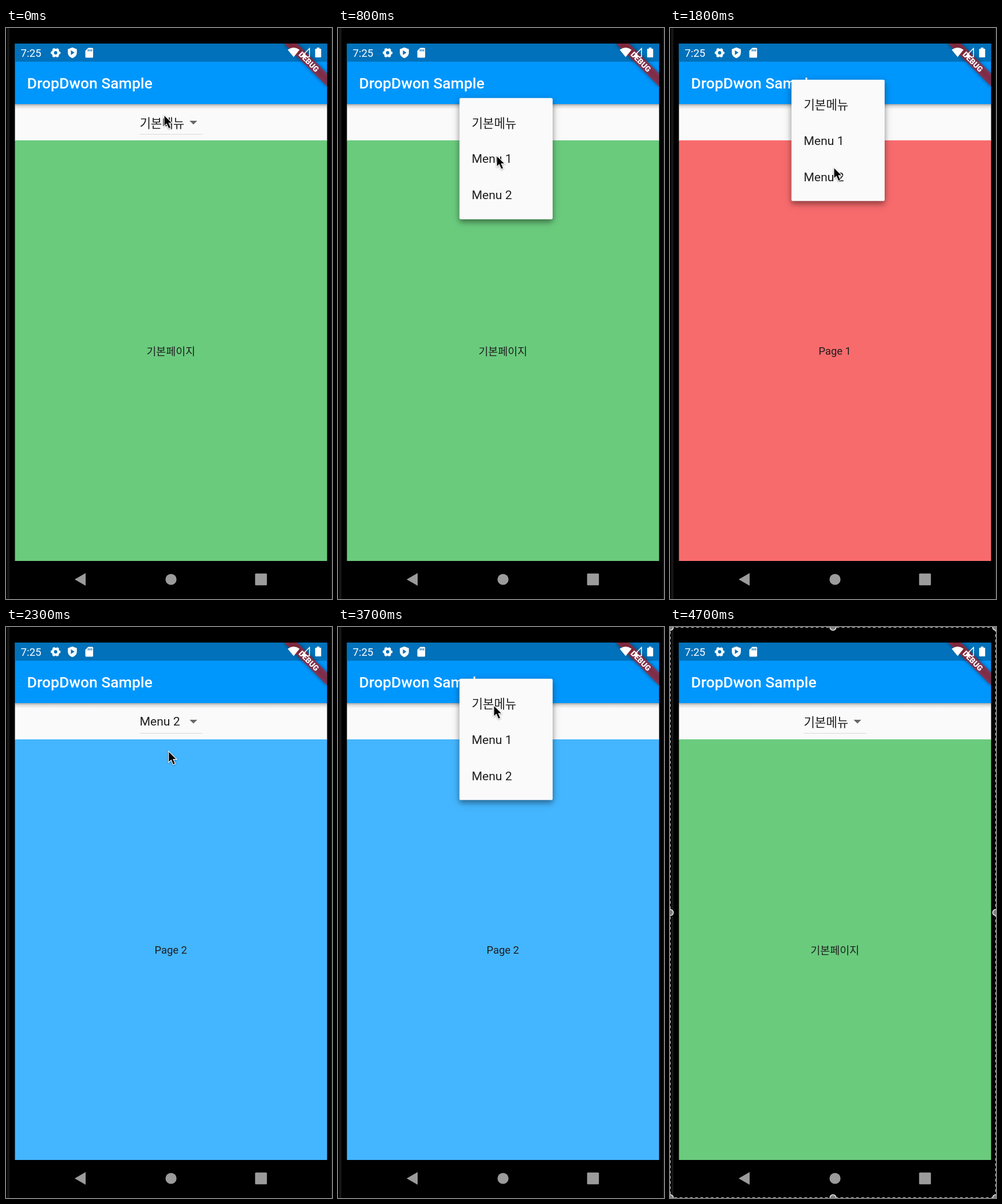
Animation, 565 px wide and 991 px high, one loop 5.4 s. Source, as an HTML page:

```html
<!DOCTYPE html>
<html lang="ko">
<head>
<meta charset="utf-8">
<title>Dropdown demo</title>
<style>
html, body { margin: 0; width: 100%; height: 100%; overflow: hidden; background: #000; }
svg { display: block; width: 565px; height: 991px; }
text { font-family: Roboto, "Noto Sans CJK KR", "Noto Sans CJK JP", "Noto Sans CJK", sans-serif; fill: #1f1f1f; }
.item { font-size: 21.06px; }
.page { font-size: 18.4px; text-anchor: middle; }
.white { fill: #fff; }
#card { fill: #fafafa; filter: drop-shadow(0 5px 4px rgba(0,0,0,.26)) drop-shadow(0 3px 7px rgba(0,0,0,.24)); }
#cursor { filter: drop-shadow(0 1.5px 1.5px rgba(0,0,0,.35)); }
</style>
</head>
<body>
<svg viewBox="0 0 565 991">
  <defs>
    <linearGradient id="shade" x1="0" y1="0" x2="0" y2="1">
      <stop offset="0" stop-opacity=".34"/>
      <stop offset=".4" stop-opacity=".12"/>
      <stop offset="1" stop-opacity="0"/>
    </linearGradient>
    <clipPath id="screen"><rect x="15.5" y="27" width="541" height="898"/></clipPath>
    <filter id="soft" x="-20%" y="-80%" width="140%" height="260%"><feGaussianBlur stdDeviation="3"/></filter>
  </defs>

  <rect width="565" height="991"/>
  <rect x="2" width="4" height="991" fill="#161616"/>
  <rect x="563" width="2" height="991" fill="#121212"/>

  <g clip-path="url(#screen)">
    <rect x="15" y="132" width="542" height="64" fill="#fafafa"/>
    <rect id="fill" x="15" y="195" width="542" height="730"/>
    <rect x="15" y="132" width="542" height="9" fill="url(#shade)"/>
    <rect x="15" y="27" width="542" height="105" fill="#0097fd"/>
    <rect x="15" y="27" width="542" height="31.5" fill="#0071ba"/>
    <text class="white" x="36.6" y="105" font-size="26.3" font-weight="500">DropDwon Sample</text>

    <text id="label" class="page" x="285.7"></text>
    <text id="value" class="item" x="231.7"></text>
    <path d="M318.2 161h13.2l-6.6 6.6z" fill="#666"/>
    <path d="M232 184.5h108.500" stroke="#d9d9d9"/>

    <g id="menu">
      <rect id="card" x="210.5" width="161.500" rx="2.6"/>
      <g id="items"></g>
    </g>

    <g transform="translate(556.500 27) rotate(45)">
      <rect x="-52.6" y="36.8" width="105.3" height="15.8" opacity=".5" filter="url(#soft)"/>
      <rect x="-52.6" y="36.8" width="105.3" height="15.8" fill="#c81c26" fill-opacity=".63"/>
      <text class="white" y="49.5" font-size="13.4" font-weight="900" text-anchor="middle">DEBUG</text>
    </g>
  </g>

  <g fill="#fff">
    <text class="white" x="25.5" y="50" font-size="18.5">7:25</text>
    <g transform="translate(86 43)" fill="none" stroke="#fff">
      <circle r="4.9" stroke-width="4"/>
      <circle r="7.2" stroke-width="2.4" stroke-dasharray="4.2 3.34" stroke-dashoffset="2.1"/>
    </g>
    <path d="M115 33.700l7.800 3v6c0 4.600-3.300 8-7.800 9.600c-4.500-1.600-7.800-5-7.800-9.600v-6z"/>
    <path d="M112.500 38.800v8l6.200-4z" fill="#0071ba"/>
    <path d="M142.500 34.500h7a1.500 1.500 0 0 1 1.500 1.500v14a1.500 1.500 0 0 1-1.500 1.500h-10.500a1.500 1.500 0 0 1-1.500-1.500v-10.500z"/>
    <path d="M142.500 37v3.500m3-3.500v3.500m3-3.500v3.500" stroke="#0071ba" stroke-width="1.500"/>
    <path d="M498.500 50.500l-10.300-12.800q10.300-7.400 20.600 0z"/>
    <path d="M526 35.500v14.500h-14.500z" fill="none" stroke="#fff" stroke-width="1.500"/>
    <path d="M512 50.500l7-7v7z"/>
    <path d="M538.800 34h4.400v2h2a1 1 0 0 1 1 1v13a1 1 0 0 1-1 1h-8.400a1 1 0 0 1-1-1v-13a1 1 0 0 1 1-1h2z"/>
  </g>

  <g fill="#9b9b9b">
    <path d="M119 957l19-11v22z"/>
    <circle cx="286" cy="957" r="9.600"/>
    <rect x="431.700" y="946.700" width="20.500" height="20.500" rx="1.500"/>
  </g>

  <path id="cursor" d="M0 0v19.500l4.400-4.100l3.500 8.100l3.700-1.600l-3.400-7.900h6z" stroke="#fff" stroke-width="1.100"/>

  <g id="frame">
    <rect x=".5" y=".5" width="564" height="990" fill="none" stroke="#000"/>
    <rect x=".5" y=".5" width="564" height="990" fill="none" stroke="#ddd" stroke-dasharray="5 4"/>
  </g>
</svg>
<script>
const LOOP = 5400, STEP = 100;
const ROW = 63.2, PAD = 10.5, CARD_H = 210.5;
const NAMES = ['기본메뉴', 'Menu 1', 'Menu 2'];
const PAGES = [['기본페이지', '#6acb7d'], ['Page 1', '#f86b6d'], ['Page 2', '#44b6ff']];

// Each visit to the menu: opening, closing, card top, choice before and after
const VISITS = [
  { open: 150, close: 850, top: 121.4, from: 0, to: 1 },
  { open: 1350, close: 2050, top: 89.8, from: 1, to: 2 },
  { open: 3050, close: 3850, top: 89.8, from: 2, to: 0 }
];

// Pointer path: time, x, y
const PATH = [
  [0, 274, 151], [300, 274, 152], [700, 275, 221], [900, 275, 222],
  [1200, 280, 173], [1500, 280, 171], [1800, 284, 242], [2100, 284, 246],
  [2400, 281, 205], [2800, 277, 157], [3100, 277, 157], [3500, 269, 138],
  [3700, 270, 136], [4000, 270, 136], [4300, 48, 408]
];
const FRAME_AT = 4700;

const $ = id => document.getElementById(id);
const clamp = v => Math.min(1, Math.max(0, v));
const mix = (a, b, p) => a + (b - a) * p;
const span = (v, a, b) => clamp((v - a) / (b - a));

function add(parent, tag, attrs) {
  const el = document.createElementNS('http://www.w3.org/2000/svg', tag);
  for (const k in attrs) el.setAttribute(k, attrs[k]);
  return parent.appendChild(el);
}

const items = NAMES.map(name => {
  const el = add($('items'), 'text', { class: 'item', x: 231.7 });
  el.textContent = name;
  return el;
});

for (const x of [0.5, 282.5, 564.5])
  for (const y of [0.5, 495.5, 990.5])
    if (x !== 282.5 || y !== 495.5)
      add($('frame'), 'circle', { cx: x, cy: y, r: 5.3, fill: '#808080', stroke: '#eee', 'stroke-width': 1.5 });

// Hangul sits slightly lower than Latin text
const drop = i => i === 0 ? 2 : 0;

function drawMenu(visit, t) {
  const on = visit && t < visit.close + 75;
  $('menu').style.display = on ? '' : 'none';
  if (!on) return;
  const p = clamp((t - visit.open) / 300);
  const grow = span(p, 0.25, 0.5);
  const start = PAD + visit.from * ROW;
  const top = mix(start, 0, grow);
  const bottom = mix(start + ROW, CARD_H, grow);
  $('menu').style.opacity = Math.min(span(p, 0, 0.25), 1 - clamp((t - visit.close) / 75));
  $('card').setAttribute('y', visit.top + top);
  $('card').setAttribute('height', bottom - top);
  const unit = 0.5 / (NAMES.length + 1.5);
  items.forEach((el, i) => {
    const begin = 0.5 + (i + 1) * unit;
    el.setAttribute('y', visit.top + PAD + (i + 0.5) * ROW + 7.4 + drop(i));
    el.style.opacity = i === visit.from ? 1 : span(p, begin, begin + 1.5 * unit);
  });
}

function drawCursor(t) {
  const n = PATH.findIndex(k => k[0] > t);
  const b = n < 0 ? PATH[PATH.length - 1] : PATH[n];
  const a = n < 0 ? b : PATH[n - 1];
  const p = span(t, a[0], b[0] + (a === b));
  const e = p * p * (3 - 2 * p);
  $('cursor').setAttribute('transform', `translate(${mix(a[1], b[1], e)} ${mix(a[2], b[2], e)})`);
  $('cursor').style.display = t < FRAME_AT ? '' : 'none';
}

function draw(t) {
  const visit = VISITS.filter(v => t >= v.open).pop();
  const choice = !visit ? 0 : t < visit.close ? visit.from : visit.to;
  $('fill').setAttribute('fill', PAGES[choice][1]);
  $('label').textContent = PAGES[choice][0];
  $('label').setAttribute('y', 566.5 + drop(choice) * 0.75);
  $('value').textContent = NAMES[choice];
  $('value').setAttribute('y', 170.9 + drop(choice));
  drawMenu(visit, t);
  drawCursor(t);
  $('frame').style.display = t < FRAME_AT ? 'none' : '';
}

const origin = performance.now();
function tick() {
  const t = (performance.now() - origin) % LOOP;
  draw(Math.floor(t / STEP) * STEP);
  requestAnimationFrame(tick);
}
tick();
</script>
</body>
</html>
```
